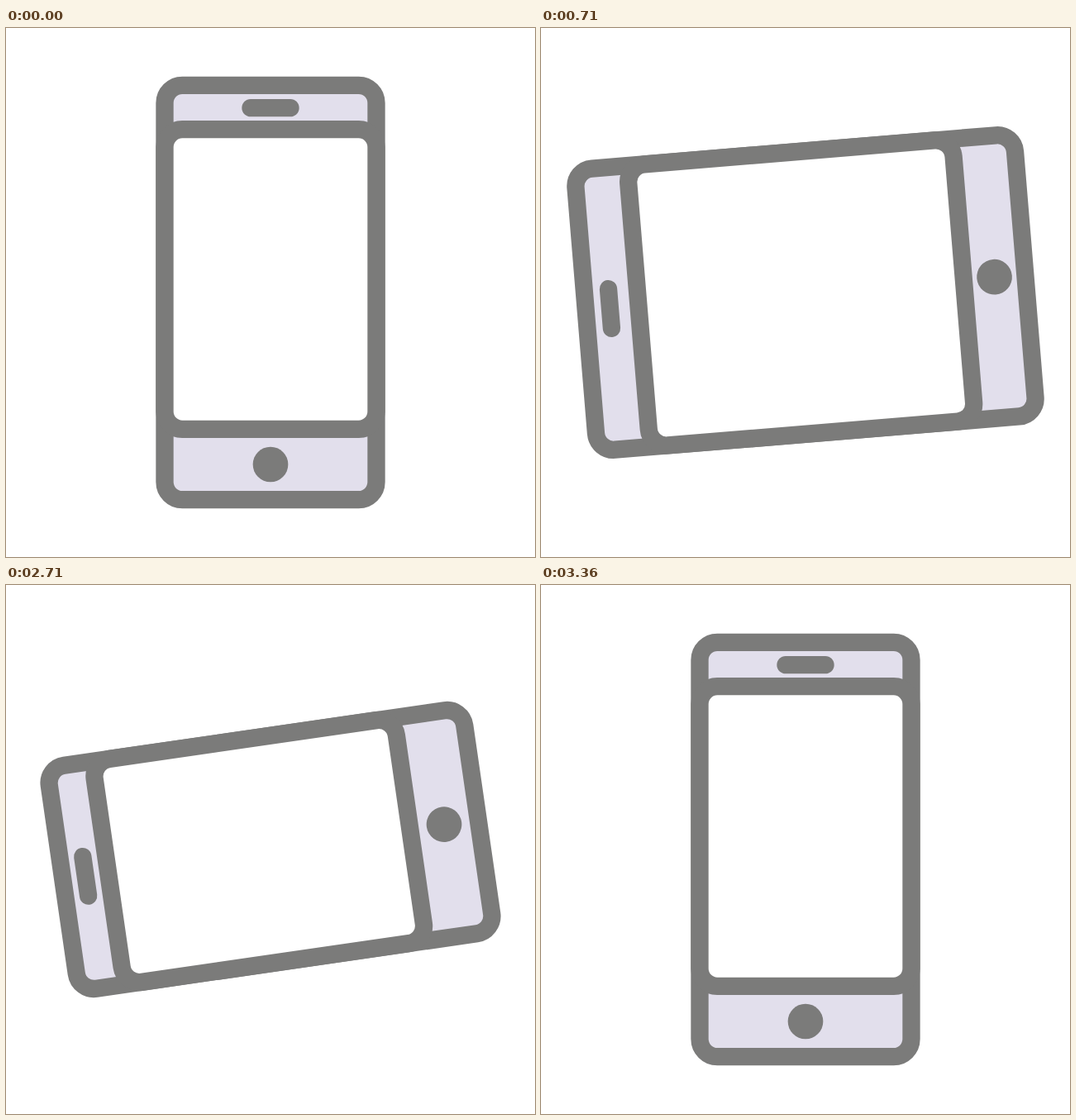
An HTML page for the animation above (4.78 s loop, 640 px wide and 640 px high).

```html
<!DOCTYPE html>
<html lang="en">
<head>
<meta charset="utf-8">
<title>Rotating device</title>
<style>
  html, body { margin: 0; width: 100%; height: 100%; overflow: hidden; background: #fff; }
  svg { display: block; width: 100%; height: 100%; }
  .outline { stroke: #7b7b7a; stroke-width: 2; stroke-linecap: round; }
</style>
</head>
<body>
<svg viewBox="-30 -30 60 60">
  <g id="device">
    <rect id="body" class="outline" rx="2" fill="#e2dfec"/>
    <rect id="screen" class="outline" rx="2" fill="#fff"/>
    <path id="speaker" class="outline" d="M-2.25 0H2.25"/>
    <circle id="button" r="2" fill="#7b7b7a"/>
  </g>
</svg>
<script>
const LOOP = 4780, HALF = 2400, STEP = 1000 / 14;
const [device, body, screen, speaker, button] =
  ['device', 'body', 'screen', 'speaker', 'button'].map(id => document.getElementById(id));

const mix = (a, b, p) => a + (b - a) * p;
const progress = (t, start, duration) => Math.min(1, Math.max(0, (t - start) / duration));
const backIn = (p, s) => p * p * ((s + 1) * p - s);
const backOut = (p, s) => 1 - backIn(1 - p, s);
// Smooth stop, with a short dip backwards at the start
const dipIn = p => p * p * (3 - 2 * p) - 1.1 * p * (1 - p) ** 2;

function setRect(rect, halfWidth, top, bottom) {
  rect.setAttribute('x', -halfWidth);
  rect.setAttribute('y', top);
  rect.setAttribute('width', 2 * halfWidth);
  rect.setAttribute('height', bottom - top);
}

function draw(time) {
  const returning = time >= HALF;
  const t = returning ? time - HALF : time;
  const resize = dipIn(progress(t, 0, 415));
  // Two quick turns of 45 degrees with a brief hold between them
  const turn = (backIn(progress(t, 80, 490), 2.45) + backOut(progress(t, 622, 290), 2.85)) / 2;
  const wide = returning ? 1 - resize : resize;
  const angle = -90 * (returning ? 1 - turn : turn);

  const halfWidth = mix(12, 16, wide);
  const halfLength = mix(23.5, 25, wide);
  setRect(body, halfWidth, -halfLength, halfLength);
  setRect(screen, halfWidth, mix(-18.5, -19, wide), mix(15.5, 18, wide));
  speaker.setAttribute('transform', `translate(0 ${mix(-20.94, -22.25, wide)})`);
  button.setAttribute('cy', mix(19.5, 21.5, wide));
  device.setAttribute('transform', `rotate(${angle})`);
}

const begin = performance.now();
function tick() {
  const t = (performance.now() - begin) % LOOP;
  draw(Math.floor((t + 5) / STEP) * STEP);
  requestAnimationFrame(tick);
}
tick();
</script>
</body>
</html>
```
